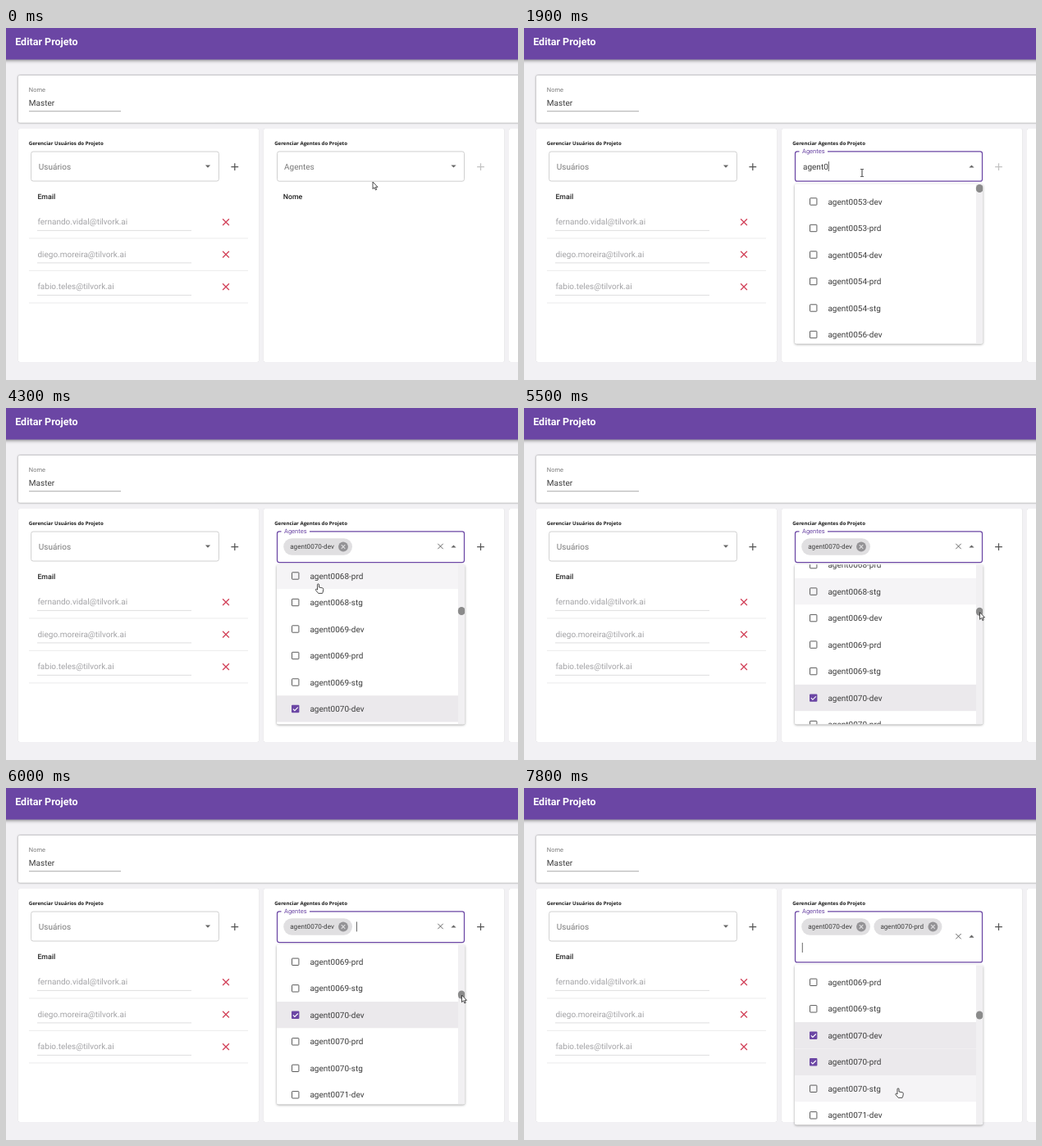
Recreate the animation shown at these times as an HTML page. Size 624 by 430 pixels, loop 8 s.

```html
<!DOCTYPE html>
<html lang="pt-BR">
<head>
<meta charset="utf-8">
<title>Editar Projeto</title>
<style>
  html, body { margin: 0; width: 100%; height: 100%; overflow: hidden; background: #f2f1f4; }
  svg { display: block; font: 10px Roboto, sans-serif; text-rendering: geometricPrecision; }
  .title { font-size: 12.5px; font-weight: 700; fill: #fff; }
  .heading { font: 700 6.1px "Open Sans", sans-serif; fill: #1c1c1c; }
  .column { font-size: 8.75px; font-weight: 500; fill: #222; }
  .small { font-size: 7.5px; }
  .chip { font-size: 8.125px; fill: #3c3c3c; }
  .muted { fill: #7a7a7a; }
  .email { fill: #a3a3a6; }
  .dark { fill: #3d3d3d; }
  .card { fill: #fff; filter: drop-shadow(0 .6px .7px rgba(0,0,0,.22)); }
  .raised { filter: drop-shadow(0 .8px .8px rgba(0,0,0,.5)); }
  .bar { fill: #6b46a4; filter: drop-shadow(0 1px 2px rgba(0,0,0,.5)); }
  .paper { fill: #fff; filter: drop-shadow(0 1.2px 1.5px rgba(0,0,0,.38)); }
  .pointer { fill: #fff; stroke: #222; stroke-width: .8; stroke-linejoin: round; }
</style>
</head>
<body>
<svg width="624" height="430" viewBox="0 0 624 430">
  <rect width="624" height="430" fill="#f2f1f4"/>
  <rect class="bar" x="-8" y="-8" width="640" height="46.5"/>
  <text class="title" x="11.2" y="20.9">Editar Projeto</text>

  <rect class="card raised" x="14.8" y="58" width="640" height="57.7" rx="2"/>
  <text class="small muted" x="27.8" y="78.2">Nome</text>
  <text class="dark" x="27.8" y="95.3">Master</text>
  <path d="M28 101.7H140" stroke="#949494" stroke-width=".8"/>

  <rect class="card" x="14.8" y="123" width="293.4" height="285" rx="2"/>
  <rect class="card" x="313.8" y="123" width="293.7" height="285" rx="2"/>
  <rect class="card" x="613" y="123" width="60" height="285" rx="2"/>
  <text class="heading" x="27.8" y="143">Gerenciar Usuários do Projeto</text>
  <text class="heading" x="327.2" y="143">Gerenciar Agentes do Projeto</text>
  <rect x="30.6" y="151" width="228.8" height="36" rx="2.5" fill="none" stroke="#c4c4c4" stroke-width=".8"/>
  <text class="muted" x="39.8" y="172.7">Usuários</text>
  <path d="M242.9 167.6h6.2l-3.1 3.1z" fill="#666"/>
  <text class="column" x="38.4" y="208.7">Email</text>
  <text class="column" x="337.8" y="208.7">Nome</text>
  <g id="users"></g>
  <g id="live"></g>
</svg>
<script>
const LOOP = 8000, STEP = 100, ROW = 32.5, PURPLE = '#6b46a4';
const $ = id => document.getElementById(id);

const text = (x, y, cls, s) => `<text class="${cls}" x="${x}" y="${y}">${s}</text>`;
const rect = (x, y, w, h, attrs) => `<rect x="${x}" y="${y}" width="${w}" height="${h}" ${attrs}/>`;
const line = (d, color, width) => `<path d="${d}" fill="none" stroke="${color}" stroke-width="${width}"/>`;
const cross = (x, y, r, color, width = 1.2) =>
  line(`M${x - r} ${y - r}l${2 * r} ${2 * r}m0 ${-2 * r}l${-2 * r} ${2 * r}`, color, width);
const plus = (x, y, color) => line(`M${x - 4.4} ${y}h8.8M${x} ${y - 4.4}v8.8`, color, 1.25);

// Last entry of a [time, ...] list already reached, and linear blending between entries
const current = (list, t) => list.filter(e => e[0] <= t).pop();
const blend = (list, t, i) => {
  const a = current(list, t), b = list.find(e => e[0] > t);
  return b ? a[i] + (b[i] - a[i]) * (t - a[0]) / (b[0] - a[0]) : a[i];
};

const FOCUS = 500, OPEN = 600, NARROW = 2200, MATCH = 2500, PICK1 = 3800, PICK2 = 6700;
const QUERY = 'agent0070';
const KEYS = [1000, 1200, 1300, 1500, 1600, 1900, 2100, NARROW, MATCH];
const CARET = [[500, 3000], [3500, 4300], [4700, 5100], [5600, 6200], [6700, 7200], [7700, 8000]];
const ANCHOR = [[0, 367.5], [5400, 367.5], [5700, 327.3], [6000, 277.3]];
const HOVER = [[0, ''], [3700, '0070-dev'], [3800, '0068-prd'], [4500, '0068-stg'],
  [6500, '0070-prd'], [6700, ''], [7500, '0070-stg']];
const MOUSE = [
  [0, 447, 188, 'arrow'], [100, 435, 184, 'beam'], [300, 412, 177, 'beam'], [3000, 412, 177, 'beam'],
  [3300, 392, 198, 'hand'], [3500, 380.5, 215, 'hand'], [4300, 380.5, 215, 'hand'],
  [5000, 551, 246, 'arrow'], [5100, 560, 250, 'arrow'], [5200, 555.5, 249, 'arrow'],
  [5400, 555.5, 249, 'arrow'], [6000, 555.5, 253, 'arrow'], [6100, 555.5, 253, 'arrow'],
  [6200, 548, 258, 'hand'], [6600, 466, 310, 'hand'], [7000, 466, 310, 'hand'], [7700, 456, 367, 'hand']
];
const POINTERS = {
  arrow: '<path class="pointer" d="M0 0V8.6L2 6.8 3.4 9.9 4.7 9.3 3.4 6.3H6z"/>',
  beam: line('M-1.8-4.5H-.5L0-4 .5-4.5H1.8M0-4V4M-1.8 4.5H-.5L0 4 .5 4.5H1.8', '#222', .9),
  hand: '<path class="pointer" d="M-1 .9a1 1 0 0 1 2 0V4l4.2.9q1.2.3 1.1 1.5L5.9 9q-.2 1.3-.9 2.4H.2L-3 7.6q-.6-1 .3-1.3.8-.2 1.7.8z"/>'
};

const FIRST = ['0053-dev', '0053-prd', '0054-dev', '0054-prd', '0054-stg', '0056-dev'];
const LATER = [68, 69, 70, 71].flatMap(n => ['dev', 'prd', 'stg'].map(s => `00${n}-${s}`));
const HOME = LATER.indexOf('0070-dev');

const ruler = document.createElement('canvas').getContext('2d');
ruler.font = '10px Roboto, sans-serif';

function checkbox(y, checked) {
  const x = 352.7;
  return checked
    ? rect(x - 4.7, y - 4.7, 9.4, 9.4, `rx="1" fill="${PURPLE}"`) +
      line(`M${x - 2.9} ${y + .1}l2.1 2.1 3.9-4`, '#fff', 1.1)
    : rect(x - 4.2, y - 4.2, 8.4, 8.4, 'rx=".6" fill="none" stroke="#5c5c5c" stroke-width="1"');
}

function listView(t) {
  if (t < NARROW) return { names: FIRST, y: 212, thumb: 196, size: 10 };
  if (t < MATCH) return { names: LATER.slice(HOME), y: 212, thumb: 210, size: 38 };
  if (t < PICK1) return { names: LATER.slice(HOME, HOME + 3), y: 212 };
  const anchor = blend(ANCHOR, t, 1), shift = t < PICK2 ? 0 : 25;
  return {
    names: LATER, y: anchor - HOME * ROW + shift, size: 10,
    thumb: 248 + (367.5 - anchor) * .049 + shift
  };
}

function dropdown(t) {
  const { names, y, thumb, size } = listView(t);
  const top = t < PICK1 ? 190.6 : t < PICK2 ? 191.3 : 216.3;
  const height = size ? 195 : 107.7;
  const picked = [t >= PICK1 && '0070-dev', t >= PICK2 && '0070-prd'];
  const hover = current(HOVER, t)[1];
  const rows = names.map((name, i) => {
    const mid = y + i * ROW, checked = picked.includes(name);
    const fill = checked ? '#ebe9ec' : name === hover ? '#f5f4f6' : '#fff';
    return rect(330, mid - ROW / 2, 229, ROW, `fill="${fill}"`) + checkbox(mid, checked) +
      text(370.4, mid + 3.6, 'dark', 'agent' + name);
  }).join('');
  const bar = size ? rect(551, top, 8.2, height, 'fill="#f1f0f2"') +
    rect(550.9, thumb - size / 2, 8.6, size, 'rx="4.3" fill="#8b8b8b"') : '';
  return `<clipPath id="view">${rect(330, top, 229.2, height, 'rx="2"')}</clipPath>` +
    rect(330, top, 229.2, height, 'rx="2" class="paper"') + `<g clip-path="url(#view)">${rows}${bar}</g>`;
}

function chip(x, name, width) {
  const icon = x + width - 11;
  return rect(x, 159.3, width, 20.4, 'rx="10.2" fill="#e0dfe1"') +
    text(x + 8, 172.4, 'chip', 'agent' + name) +
    `<circle cx="${icon}" cy="169.5" r="5.9" fill="#949396"/>` + cross(icon, 169.5, 2.3, '#e0dfe1', 1.1);
}

function field(t) {
  const focused = t >= FOCUS, filled = t >= PICK1;
  const height = t < PICK1 ? 36.3 : t < PICK2 ? 37.6 : 62;
  const mid = t < PICK2 ? 169 : 181.2;
  const border = focused ? PURPLE : t >= 200 ? '#222' : '#c4c4c4';
  let out = rect(330.5, 150.9, 228, height, `rx="2.5" fill="#fff" stroke="${border}" stroke-width="${focused ? 1.25 : .8}"`);

  const lift = Math.min(1, Math.max(0, (t - 400) / 200));
  if (lift === 1) out += rect(335.5, 149.5, 34.5, 3, 'fill="#fff"');
  out += `<text x="339" y="${172.7 - 19.5 * lift}" fill="${focused ? PURPLE : '#7a7a7a'}" font-size="${10 - 2.5 * lift}">Agentes</text>`;

  const typed = filled ? '' : QUERY.slice(0, KEYS.filter(k => k <= t).length);
  out += text(340, 172.5, 'dark', typed);
  if (filled) out += chip(338.2, '0070-dev', 83.8) + cross(529.5, mid, 3.2, '#666', 1);
  if (t >= PICK2) out += chip(426.4, '0070-prd', 83);
  if (CARET.some(([on, off]) => t >= on && t < off)) {
    const [x, y] = t >= PICK2 ? [339.3, 195] : filled ? [427.5, 169.4] : [340.6 + ruler.measureText(typed).width, 169];
    out += line(`M${x} ${y - 6}v12`, '#444', .8);
  }
  const flip = t >= OPEN ? -1 : 1;
  return out + `<path d="M542.4 ${mid - 1.5 * flip}h6.2l-3.1 ${3.1 * flip}z" fill="#666"/>` +
    plus(578.5, 169.6, filled ? '#555' : '#c2c2c2');
}

function render(t) {
  const [, , , kind] = current(MOUSE, t);
  $('live').innerHTML = (t >= OPEN ? dropdown(t) : '') + field(t) +
    `<g transform="translate(${blend(MOUSE, t, 1)} ${blend(MOUSE, t, 2)})">${POINTERS[kind]}</g>`;
}

$('users').innerHTML = plus(278.8, 169.6, '#555') +
  ['fernando.vidal', 'diego.moreira', 'fabio.teles'].map((name, i) => {
    const y = 237.2 + i * 39.5;
    return text(38.4, y + 3.2, 'email', name + '@tilvork.ai') + cross(268, y, 3.9, '#d3455c', 1.35) +
      line(`M38 ${y + 10.2}H226`, '#d6d6d8', .8) + line(`M28 ${y + 19.7}H295`, '#e6e6e8', .8);
  }).join('');

let shown = -1;
function tick() {
  const t = Math.floor(performance.now() % LOOP / STEP) * STEP;
  if (t !== shown) render(shown = t);
  requestAnimationFrame(tick);
}
tick();
</script>
</body>
</html>
```
